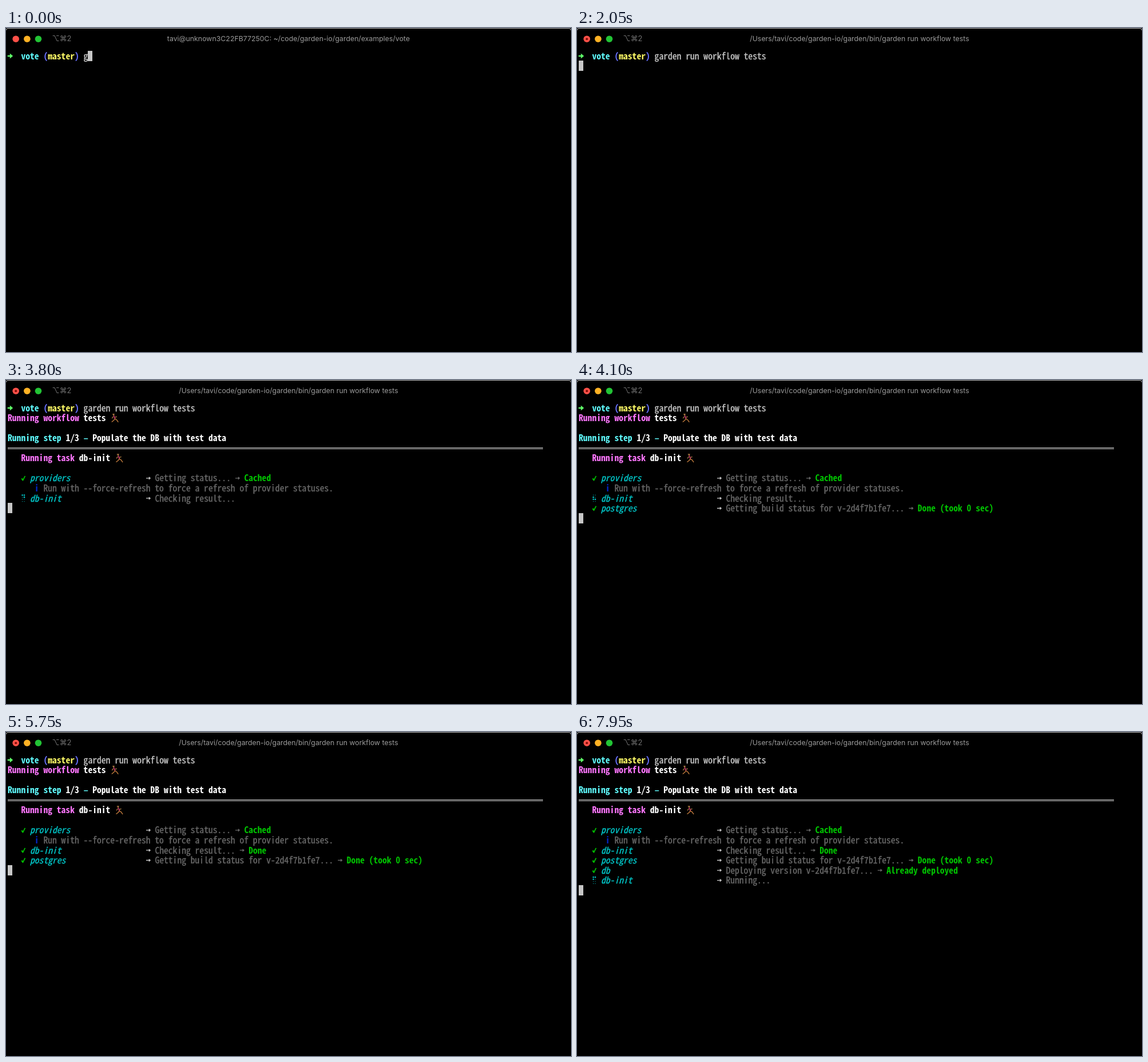
These frames come from a looping animation (988 px wide and 567 px high, 8 s). An HTML page:

```html
<!DOCTYPE html>
<html lang="en">
<head>
<meta charset="utf-8">
<title>Terminal</title>
<style>
  html, body { margin: 0; width: 100%; height: 100%; overflow: hidden; background: #000; }
  svg { display: block; }
  .bar { font-family: Inter, sans-serif; font-size: 12.35px; fill: #9a9a9a; }
  .bar.key { font-size: 12.9px; fill: #707070; }
  #term { font-family: "Noto Sans Mono CJK JP", "Noto Sans Mono", monospace; }
  #term text { stroke-width: .35px; }
  #term .b { font-weight: bold; stroke: none; }
  .i { font-style: italic; }
</style>
</head>
<body>
<svg id="stage" width="988" height="567" viewBox="0 0 988 567">
  <defs>
    <path id="arrow" d="M-.3-1.2H3.8V-4.4L9.2 0 3.8 4.4V1.2H-.3Z" />
    <path id="thin" d="M.2-.65H5V-2.8L8.4 0 5 2.8V.65H.2Z" />
    <path id="check" d="M.2 1.2 1.9-.4 3.2 1.6 6.2-4.2 7.8-3.6 3.6 4.6H2.6Z" />
    <g id="runner" fill="none" stroke-width="1.5" stroke-linecap="round" stroke-linejoin="round">
      <path d="M5-2.5 3.2.2M8.2-1.2 11-2.2" stroke="#d99a55" stroke-width="1.1" />
      <path d="M6.5-3.2 8 .6" stroke="#b02a62" stroke-width="2.1" />
      <path d="M8 1.5 6 4 2.8 6.6M8.5 1.5 11.3 3.4 13.6 6.8" stroke="#c9803f" stroke-width="1.3" />
      <circle cx="5.8" cy="-5.8" r="1.4" fill="#c9924f" />
      <path d="M4-6.6Q5.5-8.1 7-7" stroke="#5a3a22" />
    </g>
  </defs>
  <path d="M0 4Q.5.5 4 .5H984Q987.5.5 988 4" fill="none" stroke="#b4b4b4" />
  <circle cx="17.2" cy="19.2" r="5.8" fill="#ff5048" />
  <circle id="busy" cx="17.2" cy="19.2" r="2" fill="#7d0c08" />
  <circle cx="36.9" cy="19.2" r="5.8" fill="#ffb224" />
  <circle cx="56.5" cy="19.2" r="5.8" fill="#22c435" />
  <text class="bar key" x="80.5" y="23.4">⌥⌘2</text>
  <text class="bar" id="title" x="494" y="23.4" text-anchor="middle"></text>
  <g id="term"></g>
  <g id="spinner" fill="#00c5c7"></g>
  <rect id="cursor" width="8" height="18" fill="#c7c7c7" />
</svg>
<script>
const CELL = 7.8, ROW = 17.55, LOOP = 8000, ENTER = 1450;
const WHITE = "#fff", TEXT = "#c7c7c7", DIM = "#686868", GREEN = "#00c200", CYAN = "#00c5c7",
  AQUA = "#60fdff", PINK = "#ff77ff";
const COMMAND = "garden run workflow tests";
const $ = id => document.getElementById(id);
const colX = col => 3 + col * CELL;
const midY = row => 49 + row * ROW;
const add = (parent, name, attrs) => {
  const el = document.createElementNS("http://www.w3.org/2000/svg", name);
  for (const key in attrs) el.setAttribute(key, attrs[key]);
  return parent.appendChild(el);
};

// Size the font so that one character fills one cell
const pen = document.createElement("canvas").getContext("2d");
pen.font = "100px " + getComputedStyle($("term")).fontFamily;
$("term").setAttribute("font-size", CELL * 100 / pen.measureText("0").width);

const timed = [];
const show = (el, from) => { timed.push([el, from]); return el; };
const text = (row, col, str, fill, cls = "", from = 0) => {
  const el = add($("term"), "text",
    { x: colX(col), y: midY(row) + 5.6, fill, stroke: fill, class: cls });
  el.textContent = str;
  return show(el, from);
};
const icon = (row, col, id, fill, from = 0) => show(add($("term"), "use",
  { href: "#" + id, fill, transform: `translate(${colX(col)} ${midY(row)})` }), from);

icon(0, 0, "arrow", "#5ffa68");
text(0, 3, "vote", AQUA, "b");
text(0, 8, "(", "#6871ff", "b");
text(0, 9, "master", "#fffc67", "b");
text(0, 15, ")", "#6871ff", "b");
const typed = text(0, 17, "", TEXT);

text(1, 0, "Running workflow", PINK, "b", 3450);
text(1, 17, "tests", WHITE, "b", 3450);
icon(1, 23, "runner", WHITE, 3450);
text(3, 0, "Running step", AQUA, "b", 3500);
text(3, 13, "1/3", WHITE, "b", 3500);
text(3, 17, "–", AQUA, "b", 3500);
text(3, 19, "Populate the DB with test data", WHITE, "b", 3500);
show(add($("term"), "path", { d: "M3 118.5H939M3 120.5H939", stroke: TEXT }), 3500);
text(5, 3, "Running task", PINK, "b", 3550);
text(5, 16, "db-init", WHITE, "b", 3550);
icon(5, 24, "runner", WHITE, 3550);

// row, start, end, name, message, result
const tasks = [
  [7, 3600, 3700, "providers", "Getting status...", "Cached"],
  [9, 3800, 5500, "db-init", "Checking result...", "Done"],
  [10, 3900, 4050, "postgres", "Getting build status for v-2d4f7b1fe7...", "Done (took 0 sec)"],
  [11, 6000, 6300, "db", "Deploying version v-2d4f7b1fe7...", "Already deployed"],
  [12, 6400, Infinity, "db-init", "Running...", ""]
];
for (const [row, start, end, name, message, result] of tasks) {
  const after = 34 + message.length;
  text(row, 5, name, CYAN, "i", start);
  icon(row, 31, "thin", TEXT, start);
  text(row, 33, message, DIM, "", start);
  icon(row, 3, "check", GREEN, end);
  icon(row, after, "thin", DIM, end);
  text(row, after + 2, result, GREEN, "b", end);
}
text(8, 6, "i", "#0225c7", "b", 3700);
text(8, 8, "Run with --force-refresh to force a refresh of provider statuses.", DIM, "", 3700);

const SPIN = "⠋⠙⠹⠸⠼⠴⠦⠧⠇⠏";
const BITS = [1, 8, 2, 16, 4, 32, 64, 128];
const spinners = tasks.map(([row]) => {
  const g = add($("spinner"), "g", {});
  BITS.forEach((_, k) => add(g, "circle",
    { cx: 28.6 + k % 2 * 3.4, cy: midY(row) - 5.5 + (k >> 1) * 3.7 }));
  return g;
});

// Cursor row after each moment
const stops = [[0, 0], [ENTER, 1], [3450, 2], [3500, 5], [3550, 7], [3600, 8], [3700, 9],
  [3800, 10], [3900, 11], [6000, 12], [6400, 13]];

function draw(t) {
  const count = Math.min(COMMAND.length, 1 + Math.floor(t / 50));
  const running = t >= ENTER;
  typed.textContent = COMMAND.slice(0, count);
  $("title").textContent = running
    ? "/Users/tavi/code/garden-io/garden/bin/garden run workflow tests"
    : "tavi@unknown3C22FB77250C: ~/code/garden-io/garden/examples/vote";
  $("busy").style.display = running ? "" : "none";
  for (const [el, from] of timed) el.style.display = t >= from ? "" : "none";

  const row = stops.filter(([at]) => t >= at).pop()[1];
  $("cursor").setAttribute("x", Math.floor(colX(running ? 0 : 17 + count)));
  $("cursor").setAttribute("y", Math.floor(midY(row) - 9));

  const mask = SPIN.charCodeAt((Math.floor(t / 60) + 8) % SPIN.length) - 0x2800;
  tasks.forEach(([, start, end], n) => {
    spinners[n].style.display = t >= start && t < end ? "" : "none";
    [...spinners[n].children].forEach((dot, k) => dot.setAttribute("r", mask & BITS[k] ? 1.3 : 0.6));
  });
}

const begin = performance.now();
(function tick() {
  draw((performance.now() - begin) % LOOP);
  requestAnimationFrame(tick);
})();
</script>
</body>
</html>
```
